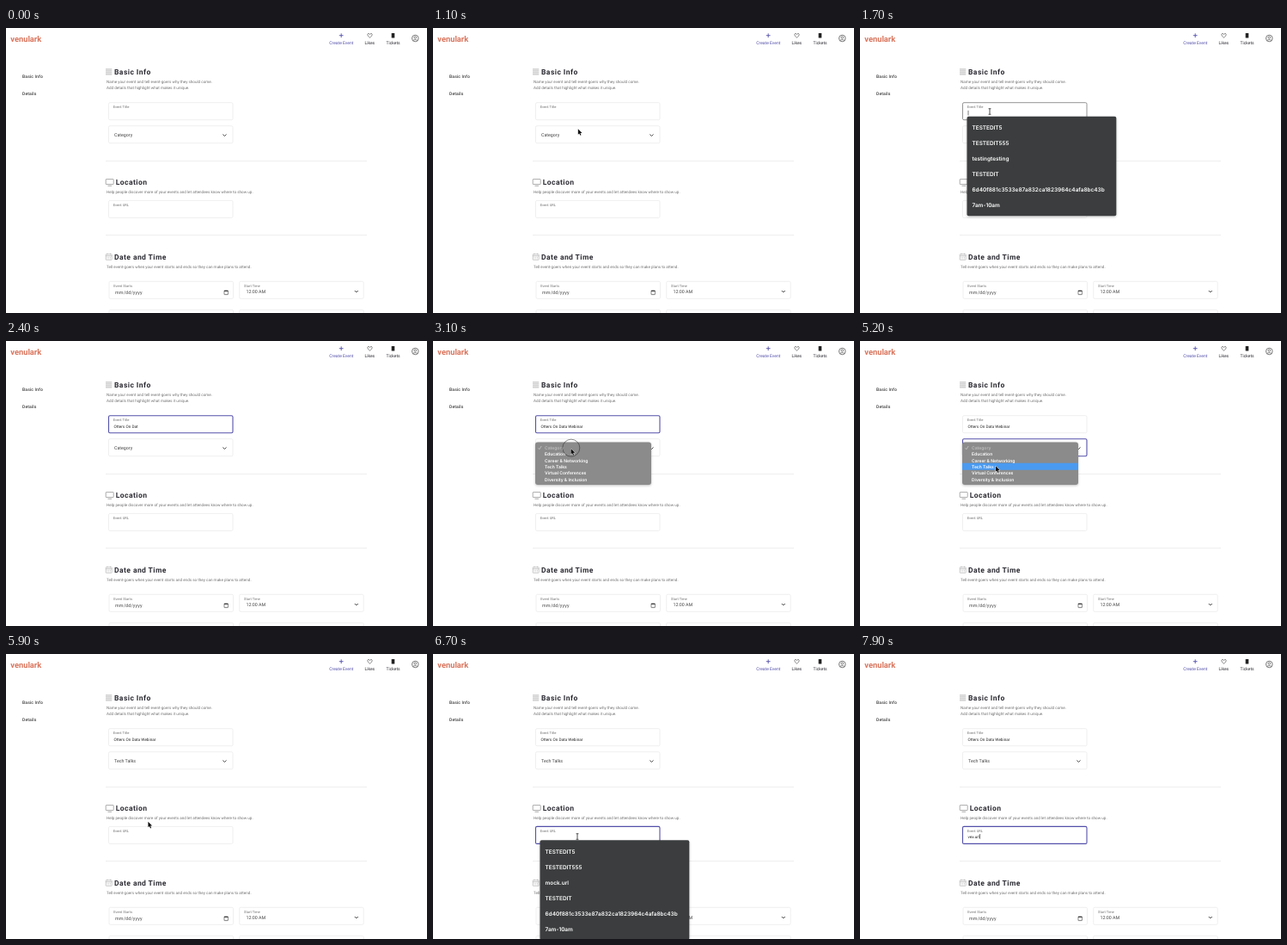
An HTML page with a canvas for the animation above (8 s loop, 490x331 px).

```html
<!DOCTYPE html>
<html lang="en">
<head>
<meta charset="utf-8">
<title>Create event form</title>
<style>
  html, body { margin: 0; width: 100%; height: 100%; overflow: hidden; background: #fff; }
  canvas { display: block; width: 490px; height: 331px; }
</style>
</head>
<body>
<canvas id="stage"></canvas>
<script>
const W = 490, H = 331, LOOP = 8000, STEP = 100;
const canvas = document.getElementById('stage');
const ctx = canvas.getContext('2d');
const ratio = window.devicePixelRatio || 1;
canvas.width = W * ratio;
canvas.height = H * ratio;

const ACCENT = '#5450aa', INK = '#2b2b33', MUTED = '#707070', LINE = '#eeeeee';
const TITLE = 'Otters On Data Webinar', URL_TEXT = 'vex.url';
const HASH = '6d40f881c3533e87a832ca1823964c4afa8bc43b';
const TITLE_HINTS = ['TESTEDIT5', 'TESTEDIT555', 'testingtesting', 'TESTEDIT', HASH, '7am-10am'];
const URL_HINTS = ['TESTEDIT5', 'TESTEDIT555', 'mock.url', 'TESTEDIT', HASH, '7am-10am'];
const CATEGORIES = ['Category', 'Education', 'Career & Networking', 'Tech Talks',
  'Virtual Conferences', 'Diversity & Inclusion'];

const TIME = {
  titleHover: 1300, titleOpen: 1600, titleFocus: 1800, titleType: 2000, titleDone: 2700,
  menuOpen: 3000, categoryFocus: 3200, menuClose: 5500,
  urlHover: 6000, urlOpen: 6200, urlType: 7000
};
const URL_KEYS = [7200, 7300, 7400, 7600, 7700, 7800, 7900];
const CLICKS = [1500, 3000, 5400, 6100];

// Pointer tip: time, x, y
const PATH = [
  [500, 265, 226], [1300, 151, 97], [2700, 151, 97], [3000, 160.5, 125], [3300, 160.5, 125],
  [4200, 157.5, 143], [4500, 157.5, 143], [5000, 158, 145.2], [5500, 158, 145.2], [6100, 168, 212]
];

const between = (t, a, b) => t >= a && t < b;

function text(str, x, y, size, { color = INK, weight = 400, family = 'Roboto', spacing = 0, align = 'left' } = {}) {
  ctx.font = `${weight} ${size}px ${family}, sans-serif`;
  ctx.letterSpacing = spacing + 'px';
  ctx.textAlign = align;
  ctx.fillStyle = color;
  ctx.fillText(str, x, y);
  return ctx.measureText(str).width;
}

function stroke(color, width, points) {
  ctx.strokeStyle = color;
  ctx.lineWidth = width;
  ctx.beginPath();
  points.forEach(([x, y], i) => i ? ctx.lineTo(x, y) : ctx.moveTo(x, y));
  ctx.stroke();
}

function box(x, y, w, h, radius, fill, line, width = 1) {
  ctx.beginPath();
  ctx.roundRect(x, y, w, h, radius);
  if (fill) { ctx.fillStyle = fill; ctx.fill(); }
  if (line) { ctx.strokeStyle = line; ctx.lineWidth = width; ctx.stroke(); }
}

function circle(x, y, r, color, width) {
  ctx.beginPath();
  ctx.arc(x, y, r, 0, 7);
  ctx.strokeStyle = color;
  ctx.lineWidth = width;
  ctx.stroke();
}

const chevron = (x, y) => stroke('#333', 0.9, [[x - 2, y - 1], [x, y + 1], [x + 2, y - 1]]);

function field(x, y, label, state = 'idle') {
  const [color, width] = { idle: [LINE, 0.9], hover: ['#888', 0.9], focus: [ACCENT, 1.1] }[state];
  box(x, y, 144.5, 20, 1.5, '#fff', color, width);
  if (label) text(label, x + 5.3, y + 6.3, 4.05, { color: MUTED });
}

function section(heading, x, y, lines) {
  text(heading, x, y, 8.55, { weight: 700, spacing: 0.42 });
  lines.forEach((line, i) => text(line, 117, y + 10.2 + i * 7, 4.58, { color: MUTED }));
}

function header() {
  text('venulark', 5.3, 16, 9.3, { color: '#d9745c', weight: 600 });
  stroke(ACCENT, 0.9, [[387.8, 8.7], [392.6, 8.7]]);
  stroke(ACCENT, 0.9, [[390.2, 6.3], [390.2, 11.1]]);
  text('Create Event', 390.3, 18.8, 5, { color: ACCENT, align: 'center' });

  ctx.beginPath();
  ctx.moveTo(423.5, 11.2);
  ctx.bezierCurveTo(418.5, 7.4, 422, 4.9, 423.5, 7.5);
  ctx.bezierCurveTo(425, 4.9, 428.5, 7.4, 423.5, 11.2);
  ctx.strokeStyle = '#333';
  ctx.lineWidth = 0.6;
  ctx.stroke();
  text('Likes', 423.3, 18.8, 5, { align: 'center' });

  box(448.7, 6, 3.6, 5.4, 0.5, '#222');
  text('Tickets', 450.6, 18.8, 5, { align: 'center' });

  circle(476.3, 12, 3.8, '#444', 0.7);
  circle(476.3, 11, 1.3, '#444', 0.6);
  stroke('#444', 0.6, [[473.7, 14.6], [475, 13.7], [477.6, 13.7], [478.9, 14.6]]);
}

function icons() {
  for (let y = 47.9; y < 55.5; y += 2) stroke('#999', 0.7, [[116, y], [123.3, y]]);
  box(116.2, 175.6, 9, 6, 0.5, null, '#888', 0.7);
  stroke('#888', 0.7, [[118.5, 183.3], [123, 183.3]]);
  box(116.2, 262.7, 7, 6.6, 0.5, null, '#aaa', 0.6);
  stroke('#aaa', 0.7, [[116.2, 264.7], [123.2, 264.7]]);
  for (const x of [118, 121.4]) stroke('#aaa', 0.6, [[x, 261.6], [x, 263.3]]);
  for (const x of [118, 119.8, 121.6])
    for (const y of [266.3, 267.9]) box(x - 0.4, y - 0.4, 0.8, 0.8, 0, '#bbb');
}

function caret(x, y, t) {
  if (t % 1000 >= 500) stroke('#222', 0.6, [[x, y - 4.7], [x, y + 1]]);
}

function inputState(t, hover, focus, blur) {
  return between(t, focus, blur) ? 'focus' : between(t, hover, focus) ? 'hover' : 'idle';
}

function form(t) {
  const side = { weight: 500, spacing: 0.15, color: '#3a3a3a' };
  text('Basic Info', 19, 58.1, 5, side);
  text('Details', 19, 77.7, 5, side);
  icons();
  for (const y of [154.5, 240.5]) stroke('#ececec', 0.9, [[116, y], [420, y]]);

  section('Basic Info', 126, 54.1, [
    'Name your event and tell event-goers why they should come.',
    'Add details that highlight what makes it unique.']);
  field(119.5, 86.7, 'Event Title', inputState(t, TIME.titleHover, TIME.titleFocus, TIME.categoryFocus));
  const progress = Math.min(1, Math.max(0, (t - TIME.titleType) / (TIME.titleDone - TIME.titleType)));
  const typed = TITLE.slice(0, Math.round(progress * TITLE.length));
  const titleWidth = text(typed, 125.5, 100.5, 4.7, { color: '#222' });
  if (between(t, TIME.titleOpen, TIME.menuOpen)) caret(126 + titleWidth, 100.5, t);

  field(119.5, 113.7, '', between(t, TIME.categoryFocus, TIME.menuClose + 200) ? 'focus' : 'idle');
  text(t < TIME.menuClose ? 'Category' : 'Tech Talks', 126, 126.4, 5.3, { color: '#444' });
  chevron(254.5, 124.5);

  section('Location', 127.7, 182.1, [
    'Help people discover more of your events and let attendees know where to show up.']);
  field(119.5, 200.4, 'Event URL', inputState(t, TIME.urlHover, TIME.urlOpen, LOOP));
  const address = URL_TEXT.slice(0, URL_KEYS.filter(key => t >= key).length);
  const urlWidth = text(address, 125.5, 213.7, 4.7, { color: '#222' });
  if (t >= TIME.urlType) caret(126 + urlWidth, 213.7, t);

  section('Date and Time', 126, 268.7, [
    'Tell event-goers when your event starts and ends so they can make plans to attend.']);
  field(120, 294.3, 'Event Starts');
  field(271.7, 294.3, 'Start Time');
  field(120, 327.3, '');
  field(271.7, 327.3, '');
  text('mm/dd/yyyy', 127, 308.7, 5.3, { spacing: 0.2, color: '#444' });
  text('12:00 AM', 279.6, 308, 5.3, { color: '#444' });
  box(254, 305, 4.4, 4.6, 0.4, null, '#333', 0.6);
  stroke('#333', 1, [[254, 305.4], [258.4, 305.4]]);
  chevron(407.8, 306);
}

function shadow(draw) {
  ctx.save();
  ctx.shadowColor = 'rgba(0,0,0,.25)';
  ctx.shadowBlur = 3 * ratio;
  ctx.shadowOffsetY = ratio;
  draw();
  ctx.restore();
}

function hints(items, y) {
  shadow(() => box(124.5, y, 173.8, 115.5, 2, '#3b3d3e'));
  items.forEach((item, i) =>
    text(item, 130.5, y + 15.4 + i * 18, 6.45, { color: '#fff', weight: 600, family: 'Inter' }));
}

function categoryMenu(pointerY) {
  const top = 119.8, row = 7.45;
  const active = Math.floor((pointerY - top) / row);
  shadow(() => box(119, 117.5, 135, 49.6, 3, '#8b8b8b'));
  if (active > 0) box(119, top + active * row - 0.3, 135, row + 0.5, 0, '#4a9af0');
  stroke('#c8c8c8', 0.8, [[122.4, 124.3], [123.8, 125.8], [126.2, 122]]);
  CATEGORIES.forEach((name, i) => text(name, 130, top + 5.8 + i * row, 5,
    { color: i ? '#fff' : '#bdbdbd', weight: 600, family: 'Inter' }));
}

function pointerAt(t) {
  const next = PATH.findIndex(point => point[0] > t);
  if (next < 0) return PATH[PATH.length - 1].slice(1);
  if (next === 0) return PATH[0].slice(1);
  const [t0, x0, y0] = PATH[next - 1], [t1, x1, y1] = PATH[next];
  const p = (t - t0) / (t1 - t0), ease = p * p * (3 - 2 * p);
  return [x0 + (x1 - x0) * ease, y0 + (y1 - y0) * ease];
}

function pointer(t, x, y) {
  if (t < PATH[0][0] || between(t, TIME.titleType, 2800) || t >= TIME.urlType) return;
  if (CLICKS.some(click => between(t, click, click + 200))) circle(x + 0.3, y - 0.8, 10, 'rgba(40,40,40,.75)', 0.7);

  const overInput = between(x, 119, 265) && (between(y, 87, 107) || between(y, 200, 221));
  if (overInput) {
    stroke('#222', 0.8, [[x, y - 3], [x, y + 3]]);
    for (const end of [-3.3, 3.3]) stroke('#222', 0.8, [[x - 1.4, y + end], [x + 1.4, y + end]]);
    return;
  }
  ctx.beginPath();
  [[0, 0], [0, 6.6], [1.5, 5.3], [2.6, 7.7], [3.7, 7.2], [2.6, 4.9], [4.7, 4.8]]
    .forEach(([dx, dy]) => ctx.lineTo(x + dx, y + dy));
  ctx.closePath();
  ctx.strokeStyle = '#fff';
  ctx.lineWidth = 0.8;
  ctx.stroke();
  ctx.fillStyle = '#111';
  ctx.fill();
}

function render(now) {
  const t = Math.floor((now % LOOP) / STEP) * STEP;
  const [x, y] = pointerAt(t);
  ctx.setTransform(ratio, 0, 0, ratio, 0, 0);
  ctx.textRendering = 'geometricPrecision';
  ctx.fillStyle = '#fff';
  ctx.fillRect(0, 0, W, H);
  header();
  form(t);
  if (between(t, TIME.titleOpen, TIME.titleType)) hints(TITLE_HINTS, 102.7);
  if (between(t, TIME.menuOpen, TIME.menuClose)) categoryMenu(y);
  if (between(t, TIME.urlOpen, TIME.urlType)) hints(URL_HINTS, 216.3);
  pointer(t, x, y);
}

const start = performance.now();
function tick() {
  render(performance.now() - start);
  requestAnimationFrame(tick);
}
tick();
</script>
</body>
</html>
```
